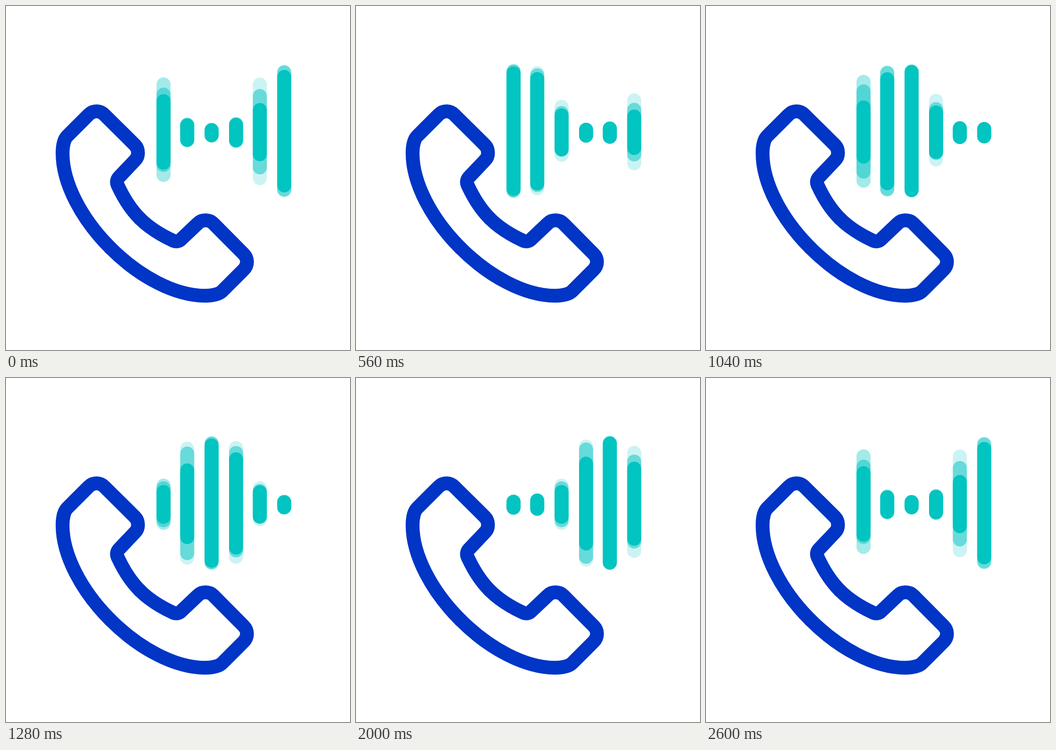
Write an HTML page that moves like this. It is 748 px wide and 748 px high and loops after 2.64 s.

```html
<!DOCTYPE html>
<html lang="en">
<head>
<meta charset="utf-8">
<title>Phone call with sound bars</title>
<style>
  html, body { margin: 0; height: 100%; overflow: hidden; background: #fff; }
  svg { display: block; width: 100vw; height: 100vh; }
</style>
</head>
<body>
<svg viewBox="0 0 748 748">
  <g fill="none" stroke="#0035c6" stroke-width="30" stroke-linecap="round">
    <path id="half" d="M227 526C165 464 123 386 123 320C123 303 127 289 133 283L180 236
      C184.5 231.5 190.5 229 197 229C203 229 209.5 232 214 236.5L280.5 302.5
      C285 307 287 313 287 319.5C287 325 285 331 281 335L245 373
      A15 15 0 0 0 242.5 389C254 414 270 441 291 462"/>
    <use href="#half" transform="matrix(0 -1 -1 0 753 753)"/>
  </g>
  <g id="bars" fill="#02c4c1"></g>
</svg>
<script>
const LOOP = 2640, STEP = 40, CYCLE = 2600;
const PEAK = 400, FALL = 1510, RISE = CYCLE - FALL;
const SMALL = { top: 254.5, bottom: 296.5 };
const TALL = { top: 126, bottom: 417.5 };

// Left edge and delay of each bar
const bars = [[327.3, 0], [378.8, 360], [431.8, 720], [485, 1160], [536.7, 1520], [589.7, 1960]];

// Back to front; each pair holds the x values of an ease curve (x1, 0, x2, 1)
const layers = [
  { alpha: 0.2, fall: [0.84, 0.24], riseTop: [0.624, 0.31], riseBottom: [0.55, 0.32] },
  { alpha: 0.5, fall: [0.647, 0.286], riseTop: [0.45, 0.306], riseBottom: [0.379, 0.303] },
  { alpha: 1, fall: [0.322, 0.308], riseTop: [0.322, 0.308], riseBottom: [0.322, 0.308] }
];

function ease([x1, x2], x) {
  let low = 0, high = 1, s;
  for (let i = 0; i < 24; i++) {
    s = (low + high) / 2;
    const at = 3 * s * (1 - s) ** 2 * x1 + 3 * s * s * (1 - s) * x2 + s ** 3;
    if (at < x) low = s; else high = s;
  }
  return s * s * (3 - 2 * s);
}

const mix = (a, b, k) => a + (b - a) * k;

function extent(layer, phase) {
  const sincePeak = (phase - PEAK + CYCLE) % CYCLE;
  const falling = sincePeak < FALL;
  const x = falling ? sincePeak / FALL : (CYCLE - sincePeak) / RISE;
  return {
    top: mix(TALL.top, SMALL.top, ease(falling ? layer.fall : layer.riseTop, x)),
    bottom: mix(TALL.bottom, SMALL.bottom, ease(falling ? layer.fall : layer.riseBottom, x))
  };
}

const group = document.getElementById("bars");
const pieces = bars.flatMap(([x, delay], index) => layers.map((layer, depth) => {
  const rect = document.createElementNS("http://www.w3.org/2000/svg", "rect");
  // The first bar has a stronger outer echo
  const alpha = index === 0 && depth === 0 ? 0.36 : layer.alpha;
  const attributes = { x, width: 30.5, rx: 15.25, "fill-opacity": alpha };
  for (const name in attributes) rect.setAttribute(name, attributes[name]);
  group.append(rect);
  return { rect, layer, delay };
}));

function draw(now) {
  const time = Math.floor((now % LOOP) / STEP) * STEP;
  for (const { rect, layer, delay } of pieces) {
    const { top, bottom } = extent(layer, (time - delay + CYCLE) % CYCLE);
    rect.setAttribute("y", top);
    rect.setAttribute("height", bottom - top);
  }
}

const start = performance.now();
function tick() {
  draw(performance.now() - start);
  requestAnimationFrame(tick);
}
tick();
</script>
</body>
</html>
```
